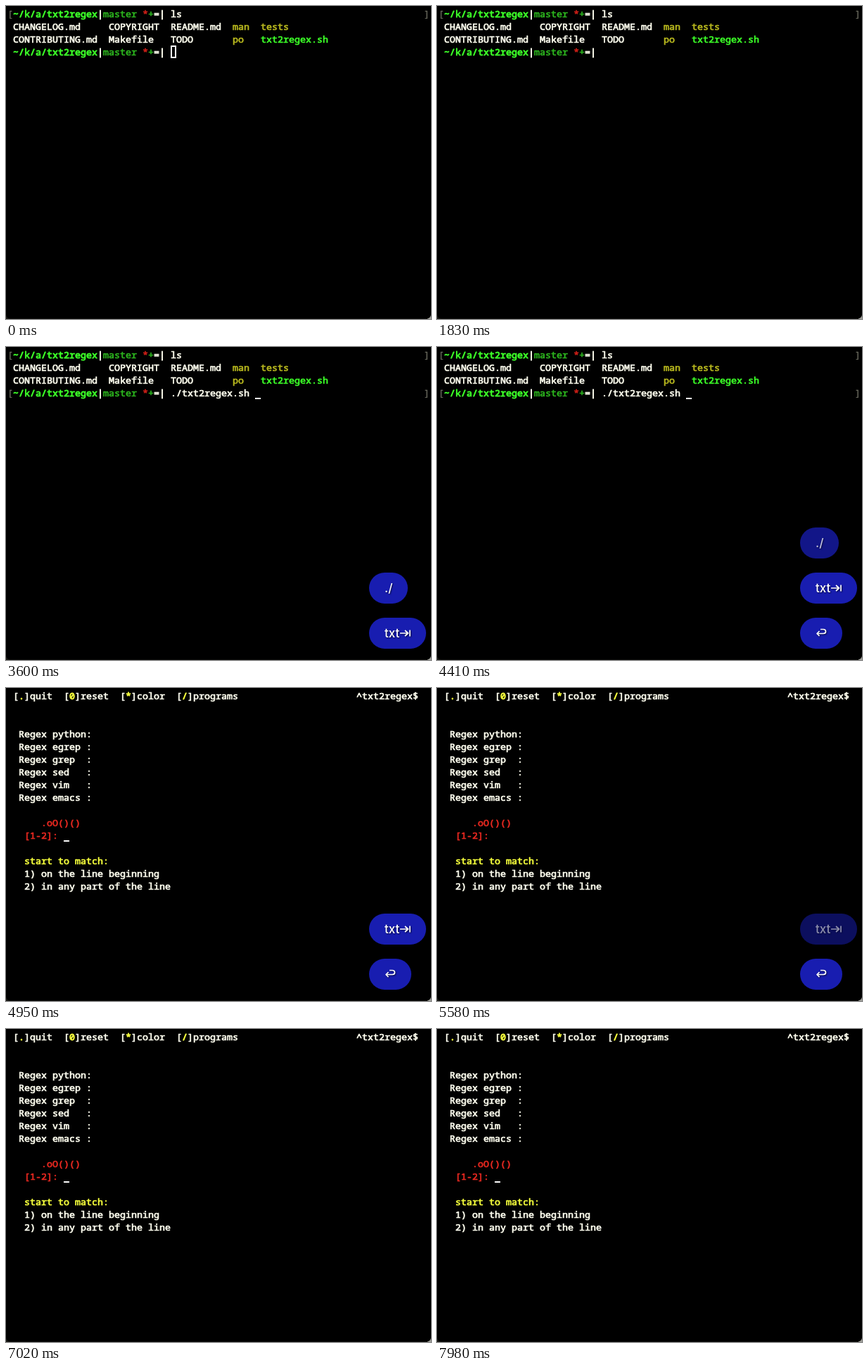
An HTML page with a canvas for the animation above (8 s loop, 604x444 px).

```html
<!DOCTYPE html>
<html lang="en">
<head>
<meta charset="utf-8">
<title>Terminal session</title>
<style>
html, body { margin: 0; width: 604px; height: 444px; overflow: hidden; background: #000; }
canvas { display: block; }
</style>
</head>
<body>
<canvas id="stage" width="604" height="444"></canvas>
<script>
const g = document.getElementById('stage').getContext('2d');
const LOOP = 8000, COL = 8, ROW = 18, LEFT = 10;
const CREAM = '#fffff0', GREEN = '#3cff28', LEAF = '#2cb41e', OLIVE = '#b8b81e',
      RED = '#e62820', YELLOW = '#f6ff3c', DIM = '#6c6c60';

const clamp = v => Math.max(0, Math.min(1, v));
const ramp = (t, from, length) => clamp((t - from) / length);
const ease = p => 1 - (1 - p) ** 3;

// A thin outline gives the semi-bold weight of the terminal face
function put(row, col, text, color = CREAM, outline = 0.7) {
  const x = LEFT + col * COL, y = 16 + row * ROW;
  g.font = '13.333px "Noto Sans Mono", "DejaVu Sans Mono", monospace';
  g.fillStyle = g.strokeStyle = color;
  g.lineWidth = outline;
  g.lineJoin = 'round';
  g.fillText(text, x, y);
  g.strokeText(text, x, y);
}

function marks(row) {
  put(row, -1, '[', DIM, 0.3);
  put(row, 73, ']', DIM, 0.3);
}

function prompt(row) {
  put(row, 0, '~/k/a/txt2regex', GREEN, 0.9);
  put(row, 15, '|', CREAM, 0.9);
  put(row, 16, 'master', LEAF);
  put(row, 23, '*', '#d02018');
  put(row, 24, '+', LEAF);
  put(row, 25, '=|', CREAM, 0.9);
}

function cursor(row, col) {
  g.fillStyle = '#fff';
  g.fillRect(LEFT + col * COL, row * ROW + 18, COL, 2);
}

// Latest entry whose start time has passed
const latest = (steps, t) => steps.filter(s => s[0] <= t).pop();

const typing = [[0, ''], [2130, '.'], [2280, './'], [2550, './t'], [2670, './tx'],
                [2820, './txt'], [3270, './txt2regex.sh ']];

function shell(t) {
  marks(0);
  prompt(0);
  put(0, 28, 'ls');
  put(1, 0, 'CHANGELOG.md     COPYRIGHT  README.md');
  put(2, 0, 'CONTRIBUTING.md  Makefile   TODO');
  put(1, 39, 'man  tests', OLIVE);
  put(2, 39, 'po', OLIVE);
  put(2, 44, 'txt2regex.sh', GREEN);
  prompt(3);
  if (t >= 3270) marks(3);

  const text = latest(typing, t)[1];
  put(3, 28, text);
  if (t < 240) {
    g.globalAlpha = 1 - ramp(t, 30, 210);
    g.strokeStyle = '#fff';
    g.lineWidth = 2;
    g.lineJoin = 'miter';
    g.strokeRect(235, 57, 6, 16);
    g.globalAlpha = 1;
  }
  const lit = (t >= 510 && t < 900) || (t >= 1380 && t < 1830) || t >= 2130;
  if (lit) cursor(3, 28 + text.length);
}

function program(t) {
  put(0, 0, '[ ]quit  [ ]reset  [ ]color  [ ]programs');
  [...'.0*/'].forEach((key, i) => put(0, [1, 10, 20, 30][i], key, YELLOW, 0.9));
  put(0, 61, '^txt2regex$');
  ['python', 'egrep', 'grep', 'sed', 'vim', 'emacs'].forEach((name, i) =>
    put(3 + i, 1, 'Regex ' + name.padEnd(6) + ':'));
  put(10, 5, '.oO()()', RED);
  put(11, 2, '[1-2]:', RED);
  put(13, 2, 'start to match:', YELLOW);
  put(14, 2, '1) on the line beginning');
  put(15, 2, '2) in any part of the line');
  if ((t - 4800 + 930) % 930 < 465) cursor(11, 9);
}

// shows: [time, text, width, icon]; lifts: times at which the pill moves up a slot
const pills = [
  { shows: [[2130, '.', 49], [2280, './', 55]], lifts: [2550, 4260], fade: 4300 },
  { shows: [[2550, 't', 49], [2670, 'tx', 58], [2820, 'txt', 65], [3240, 'txt', 81, 'tab']],
    lifts: [4260], fade: 5350 },
  { shows: [[4260, '', 60, 'enter']], lifts: [], fade: 6380 }
];

const icons = {
  tab: 'M560 22H571M567 18L571.5 22L567 26M574 17.5V26.5',
  enter: 'M545 16.5H549Q552.5 16.5 552.5 19.5Q552.5 22.5 549 22.5H540.5M543.5 19L540 22.5L543.5 26'
};

function pill({ shows, lifts, fade }, t) {
  const start = shows[0][0];
  if (t < start || t > fade + 500) return;
  const [, text, width, icon] = latest(shows, t);
  const y = 384 - 64 * lifts.reduce((sum, at) => sum + ease(ramp(t, at, 150)), 0);
  g.save();
  g.globalAlpha = ramp(t, start - 30, 120) * (1 - ramp(t, fade, 500));
  g.translate(0, y);
  g.fillStyle = '#181db0';
  g.beginPath();
  g.roundRect(516, 0, width, 44, 22);
  g.fill();
  g.shadowColor = '#000a';
  g.shadowBlur = 2;
  g.shadowOffsetX = g.shadowOffsetY = 1;
  g.font = '500 17px Inter, Roboto, sans-serif';
  g.fillStyle = g.strokeStyle = '#fff';
  g.fillText(text, 538, 28);
  if (icon) {
    g.lineWidth = 1.7;
    g.stroke(new Path2D(icons[icon]));
  }
  g.restore();
}

function windowBase() {
  g.fillStyle = '#1a1a16';
  g.fillRect(0, 0, 604, 444);
  g.fillStyle = '#a0a09a';
  g.fillRect(599, 439, 5, 5);
  g.fillStyle = '#000';
  g.beginPath();
  g.roundRect(0, -10, 604, 453.5, 6);
  g.fill();
}

function draw() {
  const t = performance.now() % LOOP;
  windowBase();
  (t < 4500 ? shell : program)(t);
  pills.forEach(p => pill(p, t));
  requestAnimationFrame(draw);
}
draw();
</script>
</body>
</html>
```
